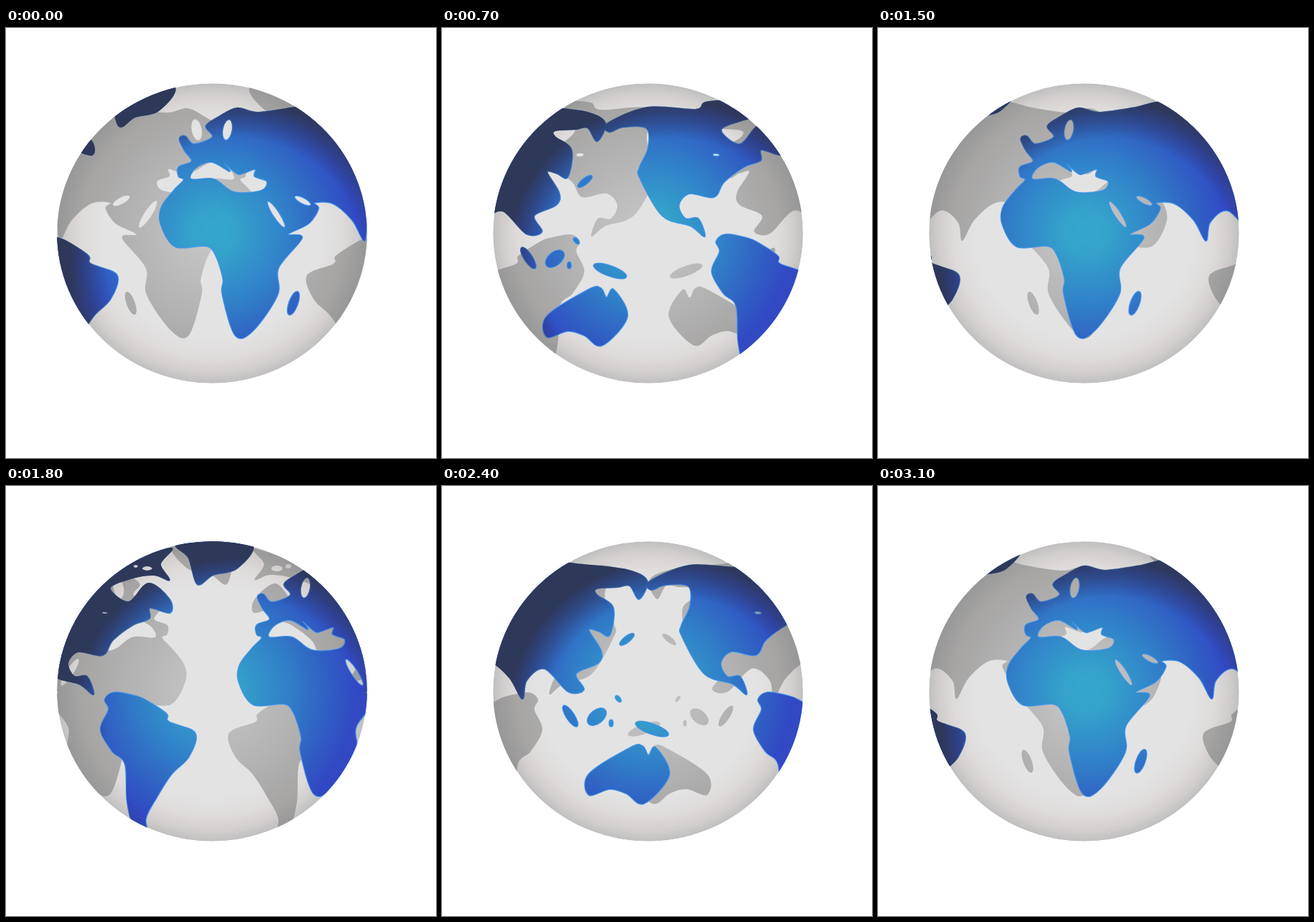
An HTML page that plays this animation: 600x600 px, repeating every 3.2 s.

```html
<!DOCTYPE html>
<html lang="en">
<head>
<meta charset="utf-8">
<title>Spinning globe</title>
<style>
  html, body { margin: 0; width: 100%; height: 100%; overflow: hidden; background: #fff; }
  svg { display: block; width: 100%; height: 100%; }
</style>
</head>
<body>
<svg viewBox="0 0 600 600">
  <defs>
    <clipPath id="globe"><ellipse cx="287.5" cy="286.5" rx="216.3" ry="209.3"/></clipPath>
    <clipPath id="land"><path class="land" clip-rule="evenodd"/></clipPath>
    <mask id="coast" maskUnits="userSpaceOnUse" x="0" y="0" width="600" height="600">
      <path class="land" fill="#fff" fill-rule="evenodd" stroke="#fff" stroke-width="2.2"/>
    </mask>
    <radialGradient id="sea">
      <stop offset=".7" stop-color="#e3e3e3"/>
      <stop offset=".84" stop-color="#dedbda"/>
      <stop offset=".94" stop-color="#d0cdcc"/>
      <stop offset="1" stop-color="#c0bfbf"/>
    </radialGradient>
    <radialGradient id="back" gradientUnits="userSpaceOnUse" cx="287.5" cy="287" r="216">
      <stop offset="0" stop-color="#c8c8c8"/>
      <stop offset=".5" stop-color="#b5b4b4"/>
      <stop offset=".85" stop-color="#a6a5a4"/>
      <stop offset="1" stop-color="#989797"/>
    </radialGradient>
    <radialGradient id="front" gradientUnits="userSpaceOnUse" cx="290" cy="285" r="220">
      <stop offset="0" stop-color="#35a7cb"/>
      <stop offset=".14" stop-color="#34a2cb"/>
      <stop offset=".45" stop-color="#3182c9"/>
      <stop offset=".7" stop-color="#3062c3"/>
      <stop offset=".9" stop-color="#3149c4"/>
      <stop offset="1" stop-color="#3448c2"/>
    </radialGradient>
    <radialGradient id="night" gradientUnits="userSpaceOnUse" cx="322" cy="335" r="242">
      <stop offset=".75" stop-color="#2e3858" stop-opacity="0"/>
      <stop offset=".86" stop-color="#2e3858" stop-opacity=".5"/>
      <stop offset=".97" stop-color="#2e3858"/>
    </radialGradient>
  </defs>
  <g clip-path="url(#globe)">
    <ellipse cx="287.5" cy="286.5" rx="216.3" ry="209.3" fill="url(#sea)"/>
    <g transform="matrix(-1 0 0 1 575 0)">
      <rect width="600" height="600" fill="url(#back)" clip-path="url(#land)"/>
    </g>
    <rect width="600" height="600" fill="#4595ee" mask="url(#coast)"/>
    <rect width="600" height="600" fill="url(#front)" clip-path="url(#land)"/>
    <rect width="600" height="600" fill="url(#night)" mask="url(#coast)"/>
  </g>
</svg>
<script>
const WORLD = 800, STEP = 50.5, TICK = 100, LOOP = 3200;

// Key points of each coast; curve() rounds them
const africa = '248,212 234,227 217,250 216,274 236,305 278,304 292,316 303,350 302,372 ' +
  '320,429 345,422 379,372 380,335 413,293 393,288';
const asia = '422,273 436,252 430,244 456,245 483,268 500,297 506,271 531,255 564,287 ' +
  '586,284 575,262 606,247 610,230 593,201 607,203 622,208 627,170 604,152 604,143 ' +
  '633,141 650,139 663,158 674,132 645,117 575,109 500,102 437,103 402,111';
const europe = '352,118 322,112 297,124 279,137 288,152 262,162 250,151 242,155 249,171 ' +
  '259,186 241,194 241,207';
const mediterranean = '258,211 265,195 287,187 312,200 304,188 322,203 330,203 348,197 ' +
  '347,207 364,214 356,227 318,229 290,211';
const northAmerica = '-122,133 -120,145 -100,138 -68,140 -66,168 -78,195 -77,210 -46,262 ' +
  '-7,276 13,291 4,266 -14,266 -23,247 -8,231 26,236 40,215 68,194 91,185 92,170 120,177 ' +
  '119,158 90,136 62,162 36,142 68,128 98,124 119,131 106,109 122,87 76,101 52,112 ' +
  '48,102 14,104 0,114 -67,111';
const southAmerica = '29,298 42,288 72,293 88,300 115,318 118,329 155,345 146,378 122,402 ' +
  '101,435 86,465 91,492 70,476 60,440 57,388 39,370 23,340 34,312';
const greenland = '128,82 146,100 158,137 180,124 213,115 233,80 150,66';
const australia = '593,402 651,365 668,363 676,376 686,365 705,403 670,443 645,429 622,423 593,431';

const coasts = [[africa, asia, europe].join(' '), mediterranean, northAmerica, southAmerica,
  greenland, australia];

// Ovals: x, y, half length, half width, tilt
const islands = [
  [401, 384, 17, 6, 110], [567, 321, 17, 5.5, 57], [604, 322, 15, 9, -40],
  [624, 331, 4.5, 2.5, 90], [634, 297, 5, 2.5, 50], [681, 339, 24, 7, 20],
  [646, 214, 12, 4, -38]
];
const waters = [
  [377, 260, 22, 5, 57], [414, 241, 13, 4.5, 28], [309, 142, 15, 7, 100],
  [72, 112, 4, 3, 0], [88, 115, 8, 4, 0], [29, 177, 5, 2.2, 5]
];

// Closed smooth curve through the key points
function curve(text) {
  const p = text.split(' ').map(s => s.split(',').map(Number));
  const n = p.length, at = i => p[(i + n) % n];
  const handle = (a, b, c) => [b[0] + (c[0] - a[0]) / 6, b[1] + (c[1] - a[1]) / 6];
  const parts = p.map((b, i) => {
    const a = at(i - 1), c = at(i + 1), e = at(i + 2);
    return 'C' + [handle(a, b, c), handle(e, c, b), c].join(' ');
  });
  return 'M' + p[0] + parts.join('') + 'Z';
}

function oval([x, y, len, wid, tilt]) {
  const rad = tilt * Math.PI / 180, dx = len * Math.cos(rad), dy = len * Math.sin(rad);
  const arc = (s) => `A${len} ${wid} ${tilt} 0 1 ${x + s * dx} ${y + s * dy}`;
  return `M${x - dx} ${y - dy}${arc(1)}${arc(-1)}Z`;
}

// Repeat the map once to the left so that it wraps
function wrap(points) {
  const shifted = text => text.split(' ').map(s => {
    const [x, y] = s.split(',');
    return `${x - WORLD},${y}`;
  }).join(' ');
  return points.map(c => curve(c) + curve(shifted(c))).join('');
}
const wrapOvals = list =>
  list.map(([x, ...rest]) => oval([x, ...rest]) + oval([x - WORLD, ...rest])).join('');

const outline = wrap(coasts) + wrapOvals([...islands, ...waters]);
const lands = document.querySelectorAll('.land');
lands.forEach(el => el.setAttribute('d', outline));

function draw(time) {
  const shift = Math.floor((time % LOOP) / TICK) * STEP % WORLD;
  lands.forEach(el => el.setAttribute('transform', `translate(${shift} 0)`));
}

const start = performance.now();
function loop() {
  draw(performance.now() - start);
  requestAnimationFrame(loop);
}
draw(0);
requestAnimationFrame(loop);
</script>
</body>
</html>
```
